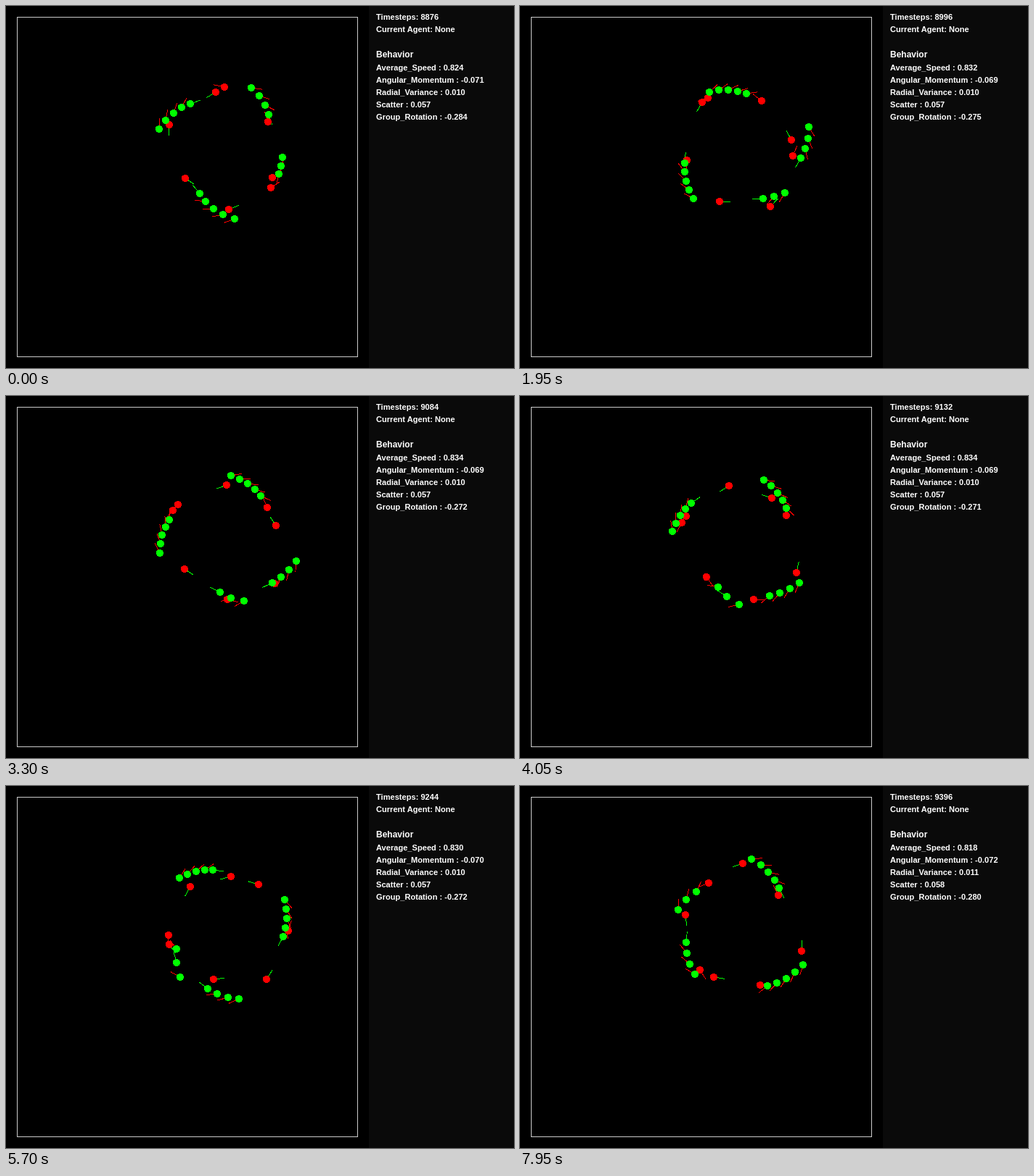
These frames come from a looping animation (700 by 500 pixels, 8 s). An HTML page:

```html
<!DOCTYPE html>
<html lang="en">
<head>
<meta charset="utf-8">
<title>Two swarms milling</title>
<style>
  html, body { margin: 0; width: 100%; height: 100%; overflow: hidden; background: #000; }
  svg { display: block; }
  text { font: bold 11.1px "Liberation Sans", Arial, sans-serif; fill: #fff; white-space: pre; }
  .head { font-size: 12px; }
</style>
</head>
<body>
<svg id="stage" width="700" height="500" viewBox="0 0 700 500">
  <rect width="700" height="500"/>
  <rect x="500" width="200" height="500" fill="#0a0a0a"/>
  <rect x="15.5" y="15.5" width="469" height="469" fill="none" stroke="#ccc"/>
  <g id="swarm" shape-rendering="crispEdges"></g>
  <text x="510" y="36">Current Agent: None</text>
  <text x="510" y="71" class="head">Behavior</text>
</svg>
<script>
const LOOP = 8000, STEP = 150;
const FIRST = 8876, MID = 256, END = 520;   // simulation time: offset, middle and end
const CX = 304, CY = 196;                   // centre of the mill
const RED = '#f00', GREEN = '#0f0';
const DEG = Math.PI / 180;

// Every path is given by its start, middle and end point.
// Chains run clockwise; the members are spread between head and tail.
const chains = [
  { size: 4, head: [362,150, 344,276, 229,216], tail: [338,113, 385,258, 241,260] },
  { size: 5, head: [254,135, 367,155, 341,276], tail: [211,170, 336,116, 390,247] },
  { size: 3, head: [376,232, 273,264, 243,146], tail: [381,209, 302,288, 218,171] },
  { size: 5, head: [267,259, 236,148, 357,141], tail: [315,294, 210,187, 319,101] }
];

// Loners run counter-clockwise.
const loners = [
  [289,119, 223,175, 267,264],
  [301,112, 229,166, 248,254],
  [361,160, 288,124, 228,178],
  [367,237, 347,141, 260,134],
  [365,251, 367,165, 307,107],
  [307,281, 381,244, 356,151],
  [247,238, 322,281, 388,228],
  [225,164, 257,250, 331,275]
];

const metrics = {
  Average_Speed: [.824, .834, .818],
  Angular_Momentum: [-.071, -.069, -.072],
  Radial_Variance: [.010, .010, .011],
  Scatter: [.057, .057, .058],
  Group_Rotation: [-.284, -.271, -.280]
};

const wrap = a => Math.atan2(Math.sin(a), Math.cos(a));
const mix = (a, b, k) => a + (b - a) * k;

// Parabola through the start, middle and end value.
function curve([p, q, r], t) {
  const first = (q - p) / MID, second = (r - q) / (END - MID);
  return p + t * (first + (t - MID) * (second - first) / END);
}

// Turns a path into angle and radius around the centre.
function orbit(points) {
  const angles = [], radii = [];
  for (let i = 0; i < points.length; i += 2) {
    const x = points[i] - CX, y = points[i + 1] - CY;
    const a = Math.atan2(y, x), last = angles.at(-1);
    angles.push(i ? last + wrap(a - last) : a);
    radii.push(Math.hypot(x, y));
  }
  return t => [curve(angles, t), curve(radii, t)];
}

function set(el, attrs) {
  for (const key in attrs) el.setAttribute(key, attrs[key]);
  return el;
}
function add(parent, tag, attrs) {
  const el = document.createElementNS('http://www.w3.org/2000/svg', tag);
  return parent.appendChild(set(el, attrs));
}

const stage = document.getElementById('stage');
const swarm = document.getElementById('swarm');
const agents = loners.map(p => ({ polar: orbit(p), dir: -1, color: RED }));
for (const { size, head, tail } of chains) {
  const front = orbit(head), back = orbit(tail);
  for (let i = 0; i < size; i++) {
    const polar = t => {
      const end = back(t);
      return front(t).map((v, j) => mix(v, end[j], i / (size - 1)));
    };
    agents.push({ polar, dir: 1, color: GREEN });
  }
}
for (const a of agents) a.line = add(swarm, 'line', {});
for (const a of agents) a.dot = add(swarm, 'circle', { r: 5.2, fill: a.color });

const clock = add(stage, 'text', { x: 510, y: 19 });
const rows = Object.entries(metrics).map(([name, values], i) =>
  ({ name, values, el: add(stage, 'text', { x: 510, y: 89 + 17 * i }) }));

// Is another agent close ahead?
function sees(a) {
  return agents.some(b => {
    const dx = b.x - a.x, dy = b.y - a.y;
    return b !== a && Math.hypot(dx, dy) < 25
      && Math.abs(wrap(Math.atan2(dy, dx) - a.course)) < 0.6;
  });
}

function draw(t) {
  for (const a of agents) {
    const [angle, radius] = a.polar(t);
    a.x = Math.round(CX + radius * Math.cos(angle));
    a.y = Math.round(CY + radius * Math.sin(angle));
    a.course = angle + a.dir * 90 * DEG;
    set(a.dot, { cx: a.x, cy: a.y });
  }
  // An agent with a neighbour ahead veers outwards, a free one inwards.
  for (const a of agents) {
    const busy = sees(a);
    const h = a.course + a.dir * (busy ? -14 : 20) * DEG;
    set(a.line, {
      x1: a.x, y1: a.y, x2: a.x + 15 * Math.cos(h), y2: a.y + 15 * Math.sin(h),
      stroke: busy ? RED : GREEN
    });
  }
  clock.textContent = 'Timesteps: ' + (FIRST + t);
  for (const { name, values, el } of rows) {
    el.textContent = `${name} : ${curve(values, t).toFixed(3)}`;
  }
}

const start = performance.now();
let shown = -1;
function tick() {
  const ms = (performance.now() - start) % LOOP;
  const n = Math.max(0, Math.floor(ms / STEP) - 1);
  const t = 8 * (n + Math.floor(n / 4));      // every fourth step is a double one
  if (t !== shown) draw(shown = t);
  requestAnimationFrame(tick);
}
tick();
</script>
</body>
</html>
```
